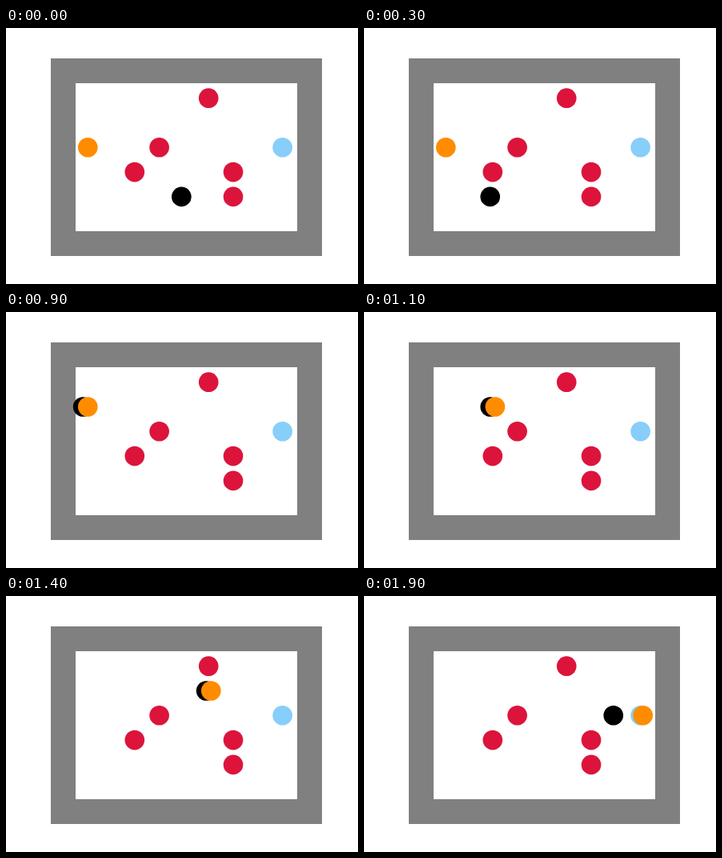
These frames come from a looping animation (440 px wide and 320 px high, 2000 ms). An HTML page with a canvas:

```html
<!DOCTYPE html>
<html>
<head>
<meta charset="utf-8">
<title>Grid courier</title>
<style>
html, body { margin: 0; width: 100%; height: 100%; overflow: hidden; background: #fff; }
canvas { display: block; }
</style>
</head>
<body>
<canvas id="stage" width="440" height="320"></canvas>
<script>
const ctx = document.getElementById('stage').getContext('2d');
const CELL = 30.8, LEFT = 86.9, TOP = 69.2, STEP = 100, STEPS = 20;
const obstacles = [[5, 0], [3, 2], [2, 3], [6, 3], [6, 4]];
const goal = [8, 2], pickup = [0, 2];

// Courier waypoints: [step, column, row]
const route = [
  [0, 4, 4], [6, 0, 4], [7, 0, 4], [8, 0, 2], [9, 0, 1],
  [15, 6, 1], [16, 6, 2], [18, 8, 2], [19, 7, 2]
];

function courierAt(step) {
  const i = route.findIndex(p => p[0] >= step);
  const [endStep, x, y] = route[i];
  if (endStep === step) return [x, y];
  const [startStep, x0, y0] = route[i - 1];
  const k = (step - startStep) / (endStep - startStep);
  return [x0 + (x - x0) * k, y0 + (y - y0) * k];
}

function disc([col, row], offset, color) {
  ctx.fillStyle = color;
  ctx.beginPath();
  ctx.arc(LEFT + (col + offset) * CELL, TOP + (row + 0.6) * CELL, 0.4 * CELL, 0, Math.PI * 2);
  ctx.fill();
}

function rect(color, x, y, w, h) {
  ctx.fillStyle = color;
  ctx.fillRect(x, y, w, h);
}

function draw(now) {
  const step = Math.floor(now / STEP) % STEPS;
  const courier = courierAt(step);
  const parcel = step < 8 ? pickup : step < 19 ? courier : goal;

  rect('#fff', 0, 0, 440, 320);
  rect('#808080', 56, 38, 339, 247);
  rect('#fff', 87, 69, 277, 185);
  disc(courier, 0.3, '#000');
  for (const cell of obstacles) disc(cell, 0.4, '#dc143c');
  disc(goal, 0.4, '#87cefa');
  disc(parcel, 0.5, '#ff8c00');
  requestAnimationFrame(draw);
}
requestAnimationFrame(draw);
</script>
</body>
</html>
```
